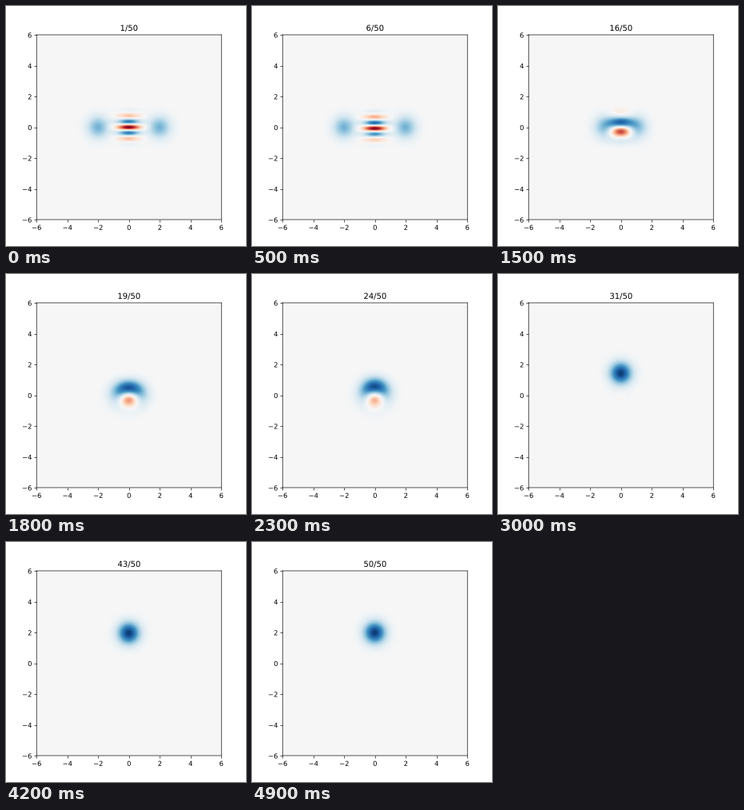
Write a matplotlib script that moves like this. It is 300 by 300 pixels and loops after 5000 ms.

```python
import numpy as np
import matplotlib.pyplot as plt
from matplotlib import patheffects
from matplotlib.animation import FuncAnimation

# Unsnapped lines and outline text give soft sub-pixel edges.
plt.rcParams["path.snap"] = False
plt.rcParams["path.effects"] = [patheffects.Normal()]

FRAMES = 50
ALPHA = 2.0          # full cat size
DEFLATE = 12         # step where the cat starts shrinking
INFLATE = 24.5       # step where it grows again along the other axis
TAU = 4.35           # relaxation time of both size changes, in steps

axis = np.linspace(-6, 6, 241)
X, Y = np.meshgrid(axis, axis)


def gauss(x, y):
    return np.exp(-2 * (x**2 + y**2))


def cat_state(step):
    """Cat size, direction, parity angle and odd-component phase."""
    if step < INFLATE:
        size = ALPHA * np.exp(-max(step - DEFLATE, 0) / TAU)
        theta = np.pi / 2 - np.pi / 4 * min(step / DEFLATE, 1)
        return size, False, theta, 1j
    size = ALPHA * (1 - np.exp(-(step - INFLATE) / TAU))
    return size, True, np.pi / 4, 1


def wigner(step):
    """Wigner function of the cat qubit, in units of 2/pi."""
    a, vertical, theta, phase = cat_state(step)
    overlap = np.exp(-2 * a**2)
    even = np.cos(theta) / np.sqrt(2 * (1 + overlap))
    odd = phase * np.sin(theta) / np.sqrt(2 * (1 - overlap))
    c, d = even + odd, even - odd
    u, v = (Y, -X) if vertical else (X, Y)
    cross = c * np.conj(d) * np.exp(-4j * a * v)
    return (abs(c)**2 * gauss(u - a, v) + abs(d)**2 * gauss(u + a, v)
            + 2 * cross.real * gauss(u, v))


fig, ax = plt.subplots(figsize=(5, 5), dpi=60)
image = ax.imshow(wigner(0), origin="lower", extent=(-6, 6, -6, 6),
                  cmap="RdBu", vmin=-1.05, vmax=1.05,
                  interpolation="bilinear")
ax.set_xticks(range(-6, 7, 2))
ax.set_yticks(range(-6, 7, 2))
title = ax.set_title(f"1/{FRAMES}")


def update(step):
    image.set_data(wigner(step))
    title.set_text(f"{step + 1}/{FRAMES}")
    return image, title


anim = FuncAnimation(fig, update, frames=FRAMES, interval=100,
                     repeat=True, repeat_delay=0)
plt.show()
```
